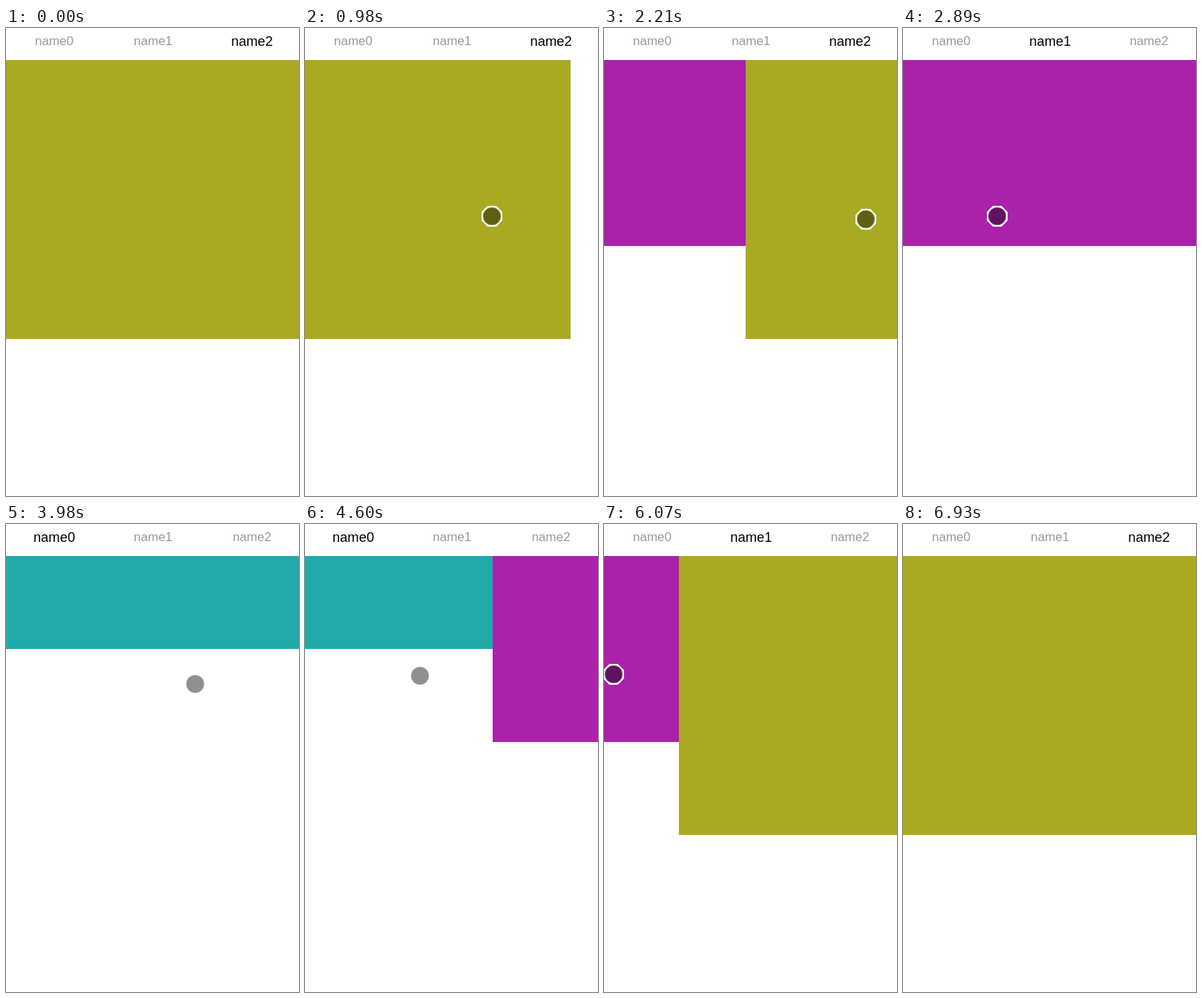
An HTML page with a canvas that plays this animation: 395 px wide and 629 px high, repeating every 7390 ms.

```html
<!DOCTYPE html>
<html lang="en">
<head>
<meta charset="utf-8">
<title>Swipe tabs</title>
<style>
  html, body { margin: 0; width: 100%; height: 100%; overflow: hidden; background: #fff; }
  canvas { position: absolute; left: 0; top: 0; }
  .tab {
    position: absolute; top: 0; width: 100px; height: 35px;
    font-family: "Liberation Sans", Arial, sans-serif; line-height: 35px; text-align: center;
  }
</style>
</head>
<body>
<canvas id="stage" width="395" height="629"></canvas>
<script>
const W = 395, H = 629, LOOP = 7390;
const PAGE_W = 400, LEFT = -2, TOP = 43, UNIT = 125;
const SETTLE = 300, STEP = 76.8;
const COLORS = ['#2aa', '#a2a', '#aa2'];
const BURSTS = [130, 520, 980, 3060, 6700]; // when the pointer sets off again
const ENTER = 130, LEAVE = 6930;
const ctx = document.getElementById('stage').getContext('2d');

// The pointer eases from stop to stop; a stop with a page ends a drag
const stop = (t, x, y, page) => ({ t, x, y, page });
const stops = [
  stop(ENTER, 350, 607),
  stop(290, 341, 423),
  stop(443, 341, 423),
  stop(830, 292, 253),
  stop(903, 292, 253),
  stop(1205, 46, 256, 2),
  stop(1517, 170, 263),
  stop(1668, 160, 262),
  stop(2330, 372, 256, 1),
  stop(2890, 127, 253),
  stop(2975, 127, 253),
  stop(3380, 372, 296, 0),
  stop(3740, 320, 284),
  stop(3981, 255, 215),
  stop(4380, 300, 204),
  stop(4742, 75, 204, 1),
  stop(5373, 310, 208),
  stop(6055, 13, 202, 2),
  stop(6530, 258, 470),
  stop(6620, 258, 470),
  stop(6860, 359, 617)
];

const tabs = COLORS.map((_, i) => {
  const el = document.createElement('div');
  el.className = 'tab';
  el.textContent = 'name' + i;
  el.style.left = (15 + i * PAGE_W / 3) + 'px';
  document.body.appendChild(el);
  return el;
});

const clamp = v => Math.max(0, Math.min(1, v));
const lerp = (a, b, p) => a + (b - a) * p;
const smooth = p => p * p * (3 - 2 * p);
const easeOut = p => 1 - (1 - p) ** 3;

// Movement advances in even steps counted from the start of each burst
function stepTime(t) {
  const start = BURSTS.filter(b => b <= t).pop();
  return start === undefined ? t : start + STEP * Math.floor((t - start + 12) / STEP);
}

function pointerAt(t) {
  const next = stops.findIndex(s => s.t > t);
  if (next <= 0) return next ? stops[stops.length - 1] : stops[0];
  const a = stops[next - 1], b = stops[next];
  const p = smooth((t - a.t) / (b.t - a.t));
  return { x: lerp(a.x, b.x, p), y: lerp(a.y, b.y, p) };
}

function pagerAt(t) {
  let from = 2, to = 2, offset = -to * PAGE_W, mix = 1;
  stops.forEach((end, i) => {
    const press = stops[i - 1];
    if (end.page === undefined || press.t > t) return;
    from = to;
    to = end.page;
    mix = easeOut(clamp((t - end.t) / SETTLE));
    const pulled = pointerAt(Math.min(t, end.t)).x - press.x - from * PAGE_W;
    offset = lerp(pulled, -to * PAGE_W, mix);
  });
  return { offset, from, to, mix };
}

function drawPages(offset) {
  COLORS.forEach((color, i) => {
    ctx.fillStyle = color;
    ctx.fillRect(Math.round(LEFT + i * PAGE_W + offset), TOP, PAGE_W, UNIT * (i + 1));
  });
}

function drawPointer({ x, y }) {
  const apothem = 14, radius = 12, corner = apothem / Math.cos(Math.PI / 8);
  ctx.save();
  ctx.translate(Math.round(x), Math.round(y));
  ctx.beginPath();
  for (let i = 0; i < 8; i++) {
    const a = (i + 0.5) * Math.PI / 4;
    ctx.lineTo(corner * Math.cos(a), corner * Math.sin(a));
  }
  ctx.closePath();
  ctx.moveTo(radius, 0);
  ctx.arc(0, 0, radius, 0, 2 * Math.PI);
  ctx.fillStyle = '#fff';
  ctx.fill('evenodd');

  ctx.beginPath();
  ctx.arc(0, 0, radius, 0, 2 * Math.PI);
  ctx.fillStyle = 'rgba(0,0,0,.44)';
  ctx.fill();
  ctx.strokeStyle = 'rgba(190,190,190,.6)';
  ctx.stroke();
  ctx.restore();
}

function styleTabs({ from, to, mix }) {
  tabs.forEach((el, i) => {
    const on = (i === from ? 1 - mix : 0) + (i === to ? mix : 0);
    const grey = Math.round(153 * (1 - on));
    el.style.color = `rgb(${grey},${grey},${grey})`;
    el.style.fontSize = lerp(17, 18.4, on) + 'px';
  });
}

function render(now) {
  const clock = now % LOOP, t = stepTime(clock);
  const pager = pagerAt(t);
  ctx.clearRect(0, 0, W, H);
  drawPages(pager.offset);
  if (clock >= ENTER && clock < LEAVE) drawPointer(pointerAt(t));
  styleTabs(pager);
}

let begin;
function tick(now) {
  begin ??= now;
  render(now - begin);
  requestAnimationFrame(tick);
}
render(0);
requestAnimationFrame(tick);
</script>
</body>
</html>
```
